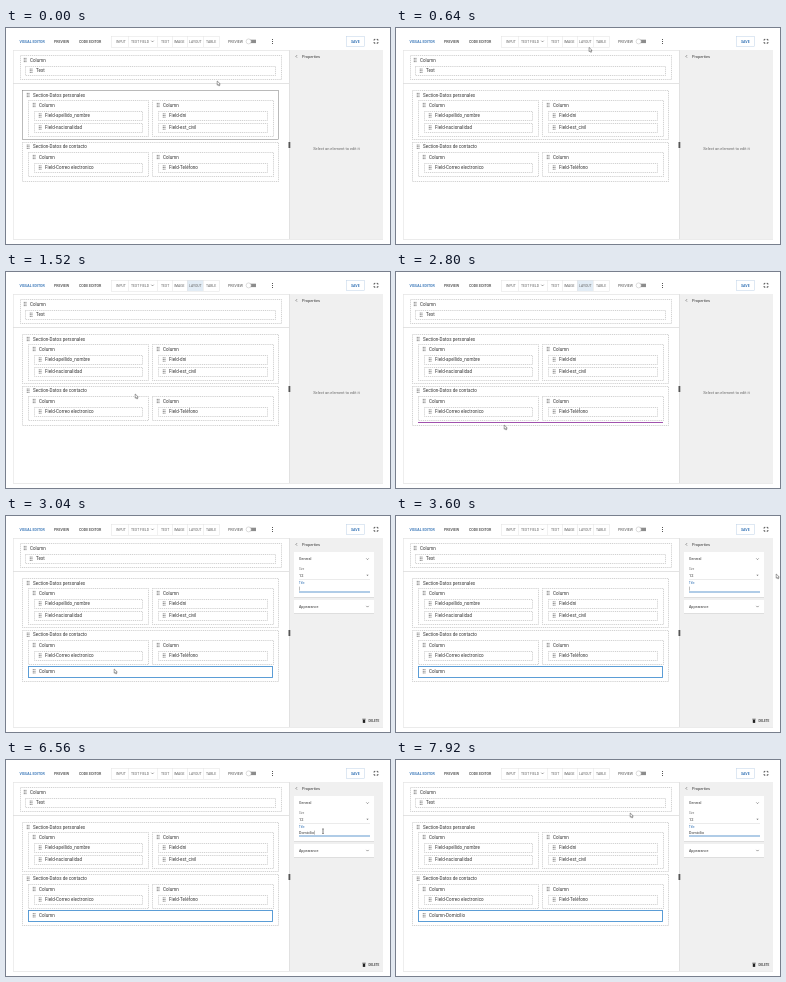
Write an HTML page with a canvas that moves like this. It is 384 by 216 pixels and loops after 8 s.

```html
<!DOCTYPE html>
<html lang="es">
<head>
<meta charset="utf-8">
<title>Form editor</title>
<style>
  html, body { margin: 0; width: 100%; height: 100%; overflow: hidden; background: #fff; }
  canvas { display: block; width: 384px; height: 216px; }
</style>
</head>
<body>
<canvas id="stage"></canvas>
<script>
const LOOP = 8000;
const BLUE = '#2468b0', INK = '#333', DASH = '#a2a2a2';
const canvas = document.getElementById('stage');
const ctx = canvas.getContext('2d');
const ratio = window.devicePixelRatio || 1;
canvas.width = 384 * ratio;
canvas.height = 216 * ratio;

const DROP = 2880, RENAME = 7520;
const NAME = 'Domicilio';
const KEY_TIMES = [4960, 5280, 5520, 5760, 5920, 6080, 6240, 6400, 6560];

// Pointer stops: time, x, y
const PATH = [
  [0, 212, 54], [80, 208, 42], [320, 208, 42], [800, 189, 13], [1120, 189, 13],
  [1360, 155, 70], [1520, 130, 123], [1920, 112, 150], [2400, 109, 154],
  [3120, 109, 154], [3600, 381, 59], [3840, 381, 59], [4080, 328, 64],
  [4320, 328, 64], [4480, 317, 71], [7440, 317, 71], [7920, 235, 54], [8000, 235, 54]
];

function pointerAt(t) {
  const i = Math.max(1, PATH.findIndex(p => p[0] > t));
  const [t0, x0, y0] = PATH[i - 1], [t1, x1, y1] = PATH[i];
  const k = (t - t0) / (t1 - t0), e = k * k * (3 - 2 * k);
  return [x0 + (x1 - x0) * e, y0 + (y1 - y0) * e];
}

function text(str, x, y, size = 4.5, color = INK, weight = 400, align = 'left') {
  ctx.font = `${weight} ${size}px Roboto, sans-serif`;
  ctx.letterSpacing = size === 4.5 ? '0.042px' : '0px';
  ctx.textAlign = align;
  ctx.textBaseline = 'alphabetic';
  ctx.fillStyle = color;
  ctx.fillText(str, x, y + size * 0.355);
}

function fill(x, y, w, h, color) {
  ctx.fillStyle = color;
  ctx.fillRect(x, y, w, h);
}

function frame(x0, y0, x1, y1, color = DASH, dash = [1.1, 0.8], width = 0.5) {
  ctx.setLineDash(dash);
  ctx.strokeStyle = color;
  ctx.lineWidth = width;
  ctx.strokeRect(x0 + 0.5, y0 + 0.5, x1 - x0, y1 - y0);
  ctx.setLineDash([]);
}

function line(points, color, width = 0.6) {
  ctx.beginPath();
  points.forEach(([x, y]) => ctx.lineTo(x, y));
  ctx.strokeStyle = color;
  ctx.lineWidth = width;
  ctx.stroke();
}

function chevron(x, y, color = '#555') {
  line([[x - 1.2, y - 0.6], [x, y + 0.6], [x + 1.2, y - 0.6]], color, 0.6);
}

function label(str, x, y) {
  for (let row = -1; row <= 1; row++)
    for (const dx of [-6.2, -4.5]) fill(x + dx, y + row * 1.65 - 0.45, 0.9, 0.9, '#555');
  text(str, x, y);
}

function column(x0, y0, x1, y1, fields) {
  frame(x0, y0, x1, y1);
  label('Column', x0 + 11, y0 + 5);
  fields.forEach((name, i) => {
    const y = y0 + 11 + i * 12;
    frame(x0 + 6, y, x1 - 6, y + 9);
    label(name, x0 + 17, y + 4.5);
  });
}

function toolbar(t) {
  text('VISUAL EDITOR', 13.5, 13.3, 3.6, BLUE, 500);
  text('PREVIEW', 48, 13.3, 3.6, '#444', 500);
  text('CODE EDITOR', 73, 13.3, 3.6, '#444', 500);

  if (t >= 800 && t < DROP) fill(181, 8, 16, 11, t >= 1120 && t < 1440 ? '#c5dcf1' : '#e2ecf5');
  frame(105, 8, 213, 19, '#e2e2e2', []);
  for (const x of [122, 151, 166, 181, 197]) fill(x, 8, 0.5, 11, '#e2e2e2');
  const tools = [['INPUT', 110], ['TEXT FIELD', 125], ['TEXT', 155], ['IMAGE', 168], ['LAYOUT', 183], ['TABLE', 200]];
  for (const [name, x] of tools) text(name, x, 13.3, 3.45, '#666');
  chevron(146.5, 13.3);

  text('PREVIEW', 222, 13.3, 3.6, '#555');
  fill(242, 11.7, 8, 3.4, '#8c8c8c');
  ctx.beginPath();
  ctx.arc(242.6, 13.4, 2.5, 0, Math.PI * 2);
  ctx.fillStyle = '#fff';
  ctx.fill();
  ctx.strokeStyle = '#bbb';
  ctx.lineWidth = 0.5;
  ctx.stroke();
  for (const y of [11, 13, 15]) fill(266, y, 1, 1, '#555');

  frame(340, 8, 358, 18, '#bed2e7', []);
  text('SAVE', 349.3, 13.3, 3.6, BLUE, 500, 'center');
  for (const sx of [-1, 1]) for (const sy of [-1, 1])
    line([[370 + sx * 0.7, 13.3 + sy * 1.9], [370 + sx * 1.9, 13.3 + sy * 1.9], [370 + sx * 1.9, 13.3 + sy * 0.7]], '#333', 0.8);
}

function form(t) {
  const dropped = t >= DROP;
  fill(7, 22, 276, 0.6, '#dedede');
  fill(7, 22, 0.6, 189, '#e3e3e3');
  fill(7, 211, 370, 0.6, '#dedede');
  fill(7, 55, 276, 0.8, '#dcdcdc');

  frame(14, 27, 275, 51);
  label('Column', 24, 32);
  frame(19, 38, 269, 47);
  label('Text', 30, 42.7);

  const hover = t < 80;
  frame(16, 62, 272, 111, hover ? '#777' : DASH, hover ? [] : undefined);
  label('Section-Datos personales', 27, 67);
  column(22, 72, 142, 108, ['Field-apellido_nombre', 'Field-nacionalidad']);
  column(146, 72, 267, 108, ['Field-dni', 'Field-est_civil']);

  frame(16, 114, 272, dropped ? 165 : 153);
  label('Section-Datos de contacto', 27, 118.7);
  column(22, 124, 142, 148, ['Field-Correo electronico']);
  column(146, 124, 267, 148, ['Field-Teléfono']);

  if (dropped) {
    frame(22, 150, 266, 161, '#4b93d2', [], 0.9);
    label(t >= RENAME ? 'Column-' + NAME : 'Column', 33, 155.3);
  } else if (t >= 1920) {
    fill(22, 150, 245, 1, '#a052ad');
  }
}

function panel(t) {
  fill(283, 22, 94, 189, '#f0f0f0');
  fill(283, 22, 0.6, 189, '#d8d8d8');
  fill(282.5, 114, 1.8, 6, '#555');
  line([[291, 27.2], [289.9, 28.4], [291, 29.6]], '#555');
  text('Properties', 296, 28.5, 3.94);
  if (t < DROP) {
    text('Select an element to edit it', 330.5, 121, 3.94, '#666', 400, 'center');
    return;
  }
  for (const [y, h] of [[36, 45], [84, 13]]) {
    fill(288, y + 0.5, 80, h + 0.5, '#dedede');
    fill(288, y, 80, h, '#fff');
  }
  text('General', 293, 42.8, 3.65);
  text('Appearance', 293, 90.5, 3.65);
  chevron(361.5, 43);
  chevron(361.5, 90.5);
  text('Size', 293, 53.3, 2.8, '#777');
  text('12', 293, 59.3, 3.94);
  ctx.fillStyle = '#666';
  ctx.beginPath();
  ctx.moveTo(360.4, 58.8);
  ctx.lineTo(362.6, 58.8);
  ctx.lineTo(361.5, 60);
  ctx.fill();
  fill(293, 63.5, 71, 0.4, '#ccc');
  text('Title', 293, 67, 2.8, BLUE);
  fill(293, 75.6, 71, 0.8, '#3a80c4');
  const typed = NAME.slice(0, KEY_TIMES.filter(k => k <= t).length);
  text(typed, 293, 72.5, 3.65);
  if (t < 7120) fill(293 + ctx.measureText(typed).width, 70.6, 0.4, 4, '#555');

  fill(356.8, 203.7, 2.4, 3.2, '#222');
  fill(356.3, 202.8, 3.4, 0.6, '#222');
  text('DELETE', 362.5, 205.3, 3.1, '#333', 500);
}

function pointer(t) {
  const [x, y] = pointerAt(t);
  if (t >= 4400 && t < 7520) {
    fill(x - 0.3, y - 2, 0.6, 4.4, '#333');
    fill(x - 0.9, y - 2.3, 1.8, 0.5, '#333');
    fill(x - 0.9, y + 2.2, 1.8, 0.5, '#333');
    return;
  }
  ctx.save();
  ctx.translate(x - 0.8, y - 1);
  ctx.beginPath();
  [[0, 0], [0, 4.2], [1, 3.4], [1.7, 5], [2.5, 4.6], [1.8, 3.1], [3.1, 3]].forEach(([px, py]) => ctx.lineTo(px, py));
  ctx.closePath();
  ctx.fillStyle = '#fff';
  ctx.fill();
  ctx.strokeStyle = '#444';
  ctx.lineWidth = 0.5;
  ctx.stroke();
  ctx.restore();
}

function draw(now) {
  const t = now % LOOP;
  ctx.setTransform(ratio, 0, 0, ratio, 0, 0);
  fill(0, 0, 384, 216, '#fff');
  toolbar(t);
  form(t);
  panel(t);
  pointer(t);
}

const start = performance.now();
function tick() {
  draw(performance.now() - start);
  requestAnimationFrame(tick);
}
tick();
</script>
</body>
</html>
```
